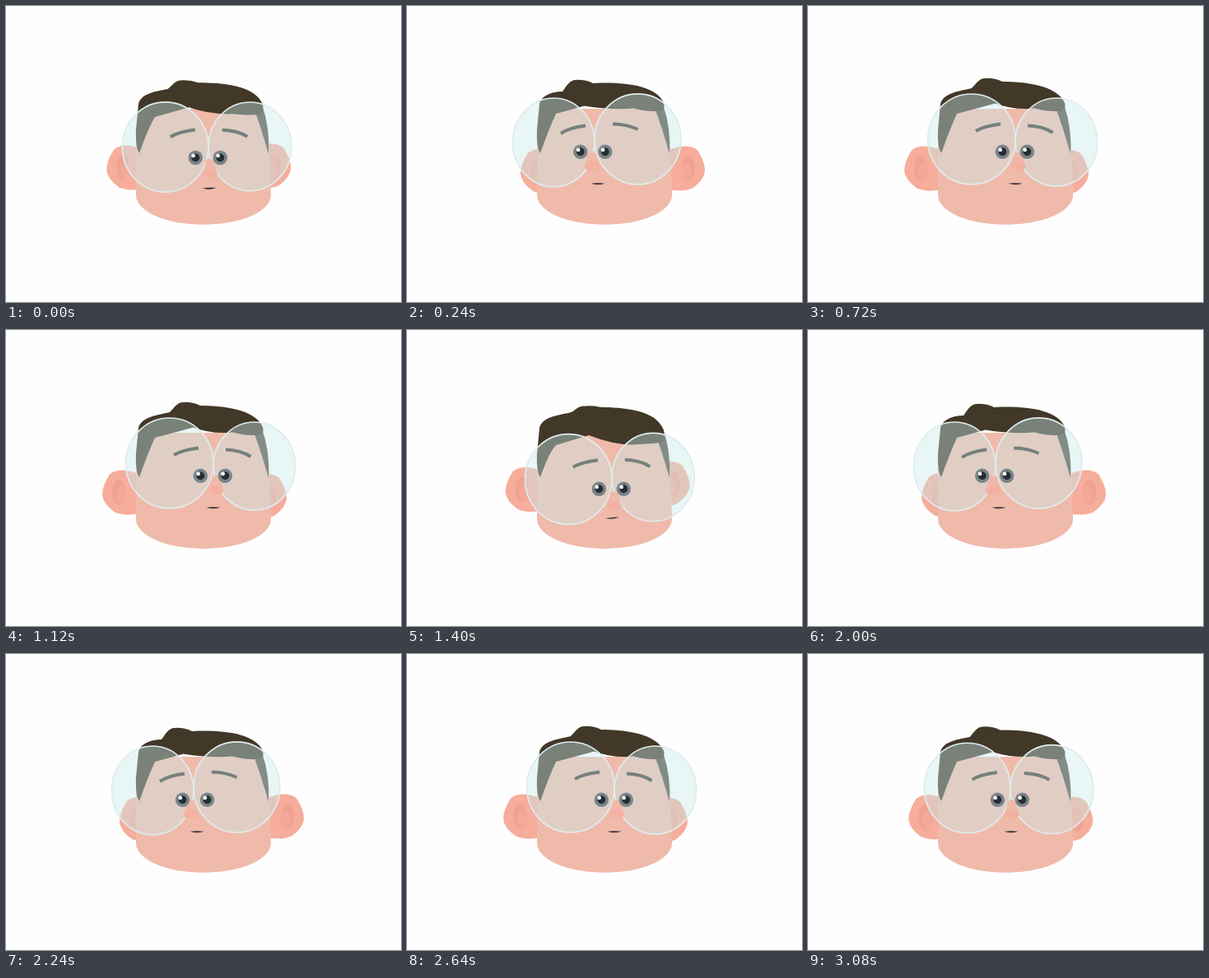
Recreate the animation shown at these times as an HTML page with a canvas. Size 480 by 360 pixels, loop 3.12 s.

```html
<!DOCTYPE html>
<html lang="en">
<head>
<meta charset="utf-8">
<title>Looking around</title>
<style>
html, body { margin: 0; width: 100%; height: 100%; overflow: hidden; background: #fefefe; }
canvas { display: block; }
</style>
</head>
<body>
<canvas id="stage" width="480" height="360"></canvas>
<script>
const ctx = document.getElementById('stage').getContext('2d');
const LOOP = 3120, STEP = 40;
const SKIN = '#f0baaa', HAIR = '#423828';

const part = (t, a, b) => Math.min(1, Math.max(0, (t - a) / (b - a)));
const ease = (t, a, b) => { const k = part(t, a, b); return k * k * (3 - 2 * k); };
const bump = (t, a, b) => Math.sin(Math.PI * part(t, a, b));
const glance = (t, a, b) => -3 * Math.sin(2 * Math.PI * part(t, a, b));

// turn: -1 left to 1 right; nod: pixels down; gaze: pixels the eyes run ahead
function pose(t) {
  const dip = ease(t, 1240, 1400) - ease(t, 1500, 1780);
  const swings = ease(t, 580, 700) - ease(t, 1680, 1960) + ease(t, 2320, 2460);
  return {
    turn: .5 - 1.5 * ease(t, 0, 200) + 2 * swings - .5 * ease(t, 2960, 3080) - .25 * dip,
    nod: 9 * (1 - ease(t, 0, 220)) + 20 * dip - 8 * (bump(t, 580, 720) + bump(t, 2320, 2480)),
    gaze: glance(t, 0, 580) + glance(t, 1720, 2320)
  };
}

function oval(x, y, rx, ry, fill) {
  ctx.beginPath();
  ctx.ellipse(x, y, rx, ry, 0, 0, Math.PI * 2);
  ctx.fillStyle = fill;
  ctx.fill();
}

function shape(path, fill) {
  ctx.fillStyle = fill;
  ctx.fill(new Path2D(path));
}

function ear(x, y, side) {
  ctx.save();
  ctx.translate(x, y);
  ctx.scale(side, 1);
  shape('M-20 -22 Q4 -32 16 -22 Q25 -8 25 3 Q24 14 10 24 Q0 29 -20 26 Z', '#f6ad9b');
  oval(5, 0, 8, 15, '#f0a292');
  oval(2, 3, 6, 11, '#f3a898');
  ctx.restore();
}

function drawFace() {
  shape('M168 125 H305 Q319 145 320 175 L322 230 A82 36 0 0 1 158 230 V170 Z', SKIN);
}

function drawHair(u, p) {
  const fx = 221.5 + 6 * u - .25 * p, fy = 120 - 1.5 * u + .45 * p;
  const tx = 199 + 5 * u, top = 89 - u + .22 * p;
  shape('M301 124 Q310 148 319 180 Q321 148 311 120 Z', '#514b44');
  shape(`M161 119 C164 107 180 104 ${tx - 5} ${102 - 2 * u}
    C${tx} ${top + 7} ${tx + 3} ${top + 1} ${tx + 10} ${top}
    Q${tx + 22} ${top - 1} ${tx + 32} ${top + 4 - .15 * p}
    C262 ${92 + .12 * p} 303 96 312 ${118 + .2 * p}
    Q314 ${125 + .5 * p} 309 ${127 + .5 * p}
    Q298 ${130 + .4 * p} 275 ${124.5 + .75 * p}
    Q250 ${127 + .62 * p} ${fx} ${fy}
    L181 ${131 + .45 * p}
    Q173 148 162 179 Q157 172 158 150 Z`, HAIR);
}

function brow(x0, y0, cx, cy, x1, y1) {
  ctx.beginPath();
  ctx.moveTo(x0, y0);
  ctx.quadraticCurveTo(cx, cy, x1, y1);
  ctx.lineWidth = 4;
  ctx.strokeStyle = '#3d3733';
  ctx.stroke();
}

function lens(x, y, rx, ry) {
  oval(x, y, rx, ry, 'rgba(200,232,234,.41)');
  ctx.lineWidth = 1.7;
  ctx.strokeStyle = '#dfecee';
  ctx.stroke();
}

function eye(x, y) {
  oval(x, y, 8.7, 8.7, '#79848a');
  oval(x, y, 4.9, 5, '#272c2f');
  oval(x - 2.7, y - 2.4, 2.4, 2.4, '#fafafa');
}

function drawNose(x, y) {
  shape(`M${x - 5} ${y - 22} Q${x} ${y - 25} ${x + 5} ${y - 22}
    L${x + 8} ${y - 6} H${x - 8} Z`, '#efb9aa');
  oval(x, y - 6, 9, 5.5, '#f4b1a2');
}

function drawMouth(x, y, tilt) {
  shape(`M${x - 8.5} ${y + tilt} Q${x} ${y - 1} ${x + 8.5} ${y - tilt}
    Q${x} ${y + 3} ${x - 8.5} ${y + tilt} Z`, '#35353a');
}

function draw(t) {
  const { turn: u, nod: p, gaze } = pose(t);
  const mid = 240 + 12 * u, away = 252 - mid;
  ctx.fillStyle = '#fefefe';
  ctx.fillRect(0, 0, 480, 360);

  ear(142 + .87 * away, 197.5 + .145 * away - .2 * p, -1);
  ear(316 + .88 * away, 202 - .19 * away - .72 * p, 1);
  drawFace();
  drawHair(u, p);

  const bx = mid - 3.5 * (u - 1), q = .72 * p, r = .63 * p;
  brow(bx - 48, 153.5 - 1.5 * u + q, bx - 38, 147 - u + q, bx - 18, 144.5 - u + q);
  brow(bx + 15, 144.5 + u + r, bx + 33, 145 + u + r, bx + 45.5, 152 + 2 * u + r);

  const lx = 51.5 + 1.7 * u, rx = 51.1 - 1.3 * u;
  lens(mid - lx, 164 - 2 * u + .95 * p, lx, 54.5 + .5 * u);
  lens(mid + rx, 163.7 + 1.8 * u + .7 * p, rx, 54.3 - .8 * u);

  drawNose(mid + 3.5 * u, 201 + .95 * p);
  for (const dx of [-15.7, 14.3]) eye(mid + dx + gaze, 177.3 + .8 * p);
  drawMouth(mid + 2 - 2 * u, 215.8 + .62 * p, .04 * Math.max(0, p));
}

const start = performance.now();
function tick() {
  const t = (performance.now() - start) % LOOP;
  draw(Math.floor(t / STEP) * STEP);
  requestAnimationFrame(tick);
}
tick();
</script>
</body>
</html>
```
